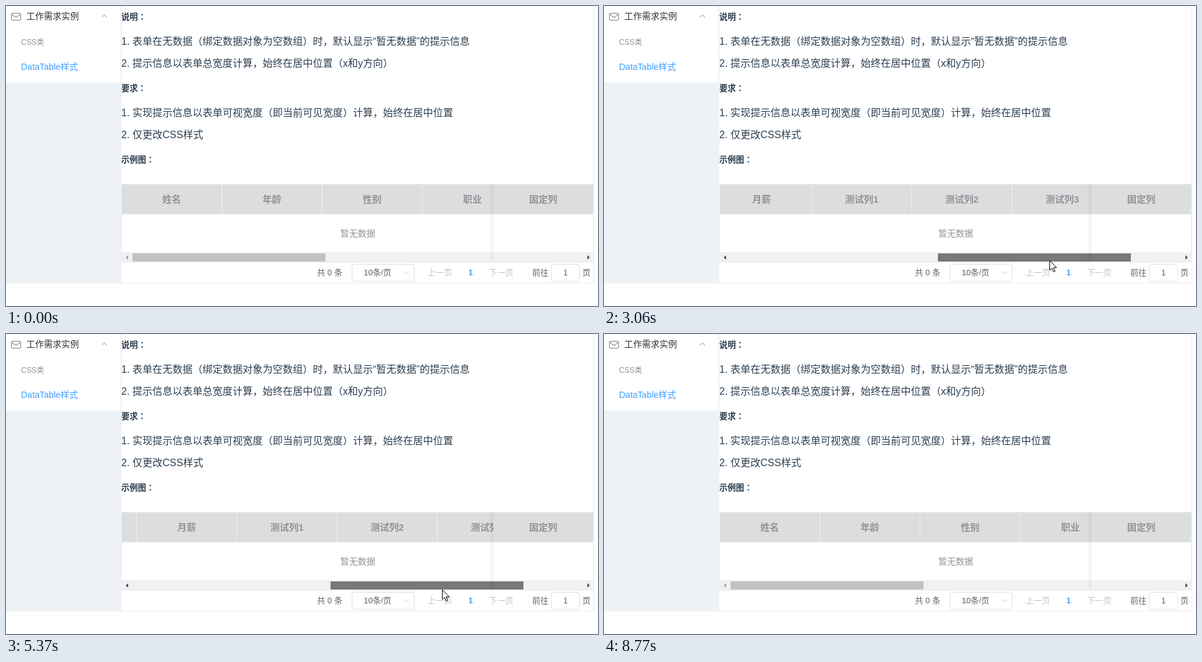
An HTML page that plays this animation: 945 px wide and 479 px high, repeating every 9.47 s.

```html
<!DOCTYPE html>
<html lang="zh-CN">
<head>
<meta charset="utf-8">
<title>DataTable</title>
<style>
  html, body { margin: 0; width: 100%; height: 100%; overflow: hidden; background: #fff; }
  svg { display: block; }
  text { font-family: "Liberation Sans", Arial, "Noto Sans CJK SC", "Noto Sans CJK", sans-serif; }
  /* this cut centres the full-width colon */
  .title { font-family: "Noto Sans CJK JP", "Noto Sans CJK", sans-serif; }
  .title, .bold { font-weight: 700; }
  .mid { text-anchor: middle; }
  .line { fill: none; stroke: #ebeef5; shape-rendering: crispEdges; }
  .box { fill: #fff; stroke: #dcdfe6; }
  .icon { fill: none; stroke: #909399; }
</style>
</head>
<body>
<svg width="945" height="479" viewBox="0 0 945 479">
  <defs>
    <clipPath id="view"><rect x="185" y="285" width="593" height="47"/></clipPath>
    <linearGradient id="shade">
      <stop offset="0" stop-opacity="0"/>
      <stop offset="1" stop-opacity=".05"/>
    </linearGradient>
  </defs>

  <!-- side menu -->
  <rect y="122" width="184" height="321" fill="#eef1f6"/>
  <path d="M183.5 0V122" stroke="#e6e6e6"/>
  <rect class="icon" x="8.6" y="11.6" width="14.8" height="11" rx="1.5" stroke-width="1.2"/>
  <path class="icon" d="M9 13.2L16 18.6L23 13.2" stroke-width="1.2"/>
  <path class="icon" d="M153 18L157 14L161 18"/>

  <!-- page edges -->
  <path d="M938.5 0V442.5H184" fill="none" stroke="#eaeaea" shape-rendering="crispEdges"/>

  <!-- table -->
  <rect x="184" y="284" width="754" height="48" fill="#dcdddd"/>
  <g clip-path="url(#view)"><g id="head"></g></g>
  <path class="line" d="M184 284.5H938M184 332.5H938M184.5 284V409M937.5 284V409M184 409.5H938"/>

  <!-- scrollbar -->
  <rect x="185" y="393" width="753" height="16" fill="#f1f1f1"/>
  <rect id="thumb" y="395" width="308" height="13"/>
  <path id="left" d="M191 401.5L195 398V405Z"/>
  <path id="right" d="M932 401.5L928 398V405Z"/>
  <rect x="770" y="285" width="8" height="123" fill="url(#shade)"/>

  <!-- pager -->
  <rect class="box" x="552.5" y="412.5" width="99" height="27" rx="3"/>
  <rect class="box" x="870.5" y="412.5" width="45" height="27" rx="3"/>
  <path d="M635.5 424L639.5 428L643.5 424" fill="none" stroke="#c0c4cc"/>

  <g id="labels"></g>
  <path id="cursor" d="M.5 .5V16L4.1 12.6L6.6 18.5L9 17.5L6.5 11.7H11.5Z" fill="#fff" stroke="#000"/>
</svg>
<script>
const $ = id => document.getElementById(id);
const INK = '#2c3e50', GREY = '#909399', DARK = '#606266', PALE = '#c0c4cc', BLUE = '#409eff';

function add(parent, tag, attrs, content = '') {
  const el = document.createElementNS('http://www.w3.org/2000/svg', tag);
  for (const k in attrs) el.setAttribute(k, attrs[k]);
  el.textContent = content;
  parent.append(el);
}

function label(content, x, y, size, fill, style = '', parent = $('labels')) {
  const lang = style === 'title' ? 'ja' : 'zh-CN';
  add(parent, 'text', { x, y, 'font-size': size, fill, class: style, lang }, content);
}

label('工作需求实例', 32.5, 21, 14, '#303133');
label('CSS类', 24, 62, 12, GREY);
label('DataTable样式', 24, 102, 14, BLUE);

const sections = {
  '说明：': [
    '表单在无数据（绑定数据对象为空数组）时，默认显示“暂无数据”的提示信息',
    '提示信息以表单总宽度计算，始终在居中位置（x和y方向）'
  ],
  '要求：': [
    '实现提示信息以表单可视宽度（即当前可见宽度）计算，始终在居中位置',
    '仅更改CSS样式'
  ],
  '示例图：': []
};
Object.entries(sections).forEach(([title, items], i) => {
  const top = 22 + 114 * i;
  label(title, 184, top, 13.28, INK, 'title');
  items.forEach((item, j) => label(`${j + 1}. ${item}`, 184, top + 40 + 35 * j, 16, INK));
});

const columns = ['姓名', '年龄', '性别', '职业', '出生日期', '月薪', '测试列1', '测试列2', '测试列3', '测试列4'];
columns.forEach((name, i) => {
  const x = 184 + 160 * i;
  add($('head'), 'path', { class: 'line', d: `M${x + 160.5} 285V332` });
  label(name, x + 80.5, 314, 15, GREY, 'mid bold', $('head'));
});
label('固定列', 857.5, 314, 15, GREY, 'mid bold');
label('暂无数据', 561.5, 368, 14, GREY, 'mid');

const pager = (content, x, fill, style) => label(content, x, 430, 13, fill, style);
pager('共 0 条', 496.5, DARK);
pager('10条/页', 593, DARK, 'mid');
pager('上一页', 673, PALE);
pager('1', 741.5, BLUE, 'mid bold');
pager('下一页', 771, PALE);
pager('前往', 840, DARK);
pager('1', 893, DARK, 'mid');
pager('页', 920, DARK);

const LOOP = 9470, STEP = 76.9;
const TRACK = 202, THUMB = 308, TRAVEL = 410, SCROLL = 1007;
const GRIP = 380; // pointer x with the thumb at rest

// The pointer moves in bursts and rests between them
const bursts = [[200, 970], [1360, 2740], [2910, 3990], [4220, 8140], [8310, 8770]];

// Pointer path: time, x, y
const path = [
  [200, 590, 466], [970, GRIP, 404],
  [1360, 383, 404], [1668, 423, 406], [2360, 730, 411], [2590, 803, 408],
  [2910, 780, 407], [3604, 468, 401], [3990, 379, 403],
  [4220, 385, 404], [4681, 658, 405], [5140, 796, 409],
  [6064, 399, 405], [6220, GRIP, 404], [7150, 537, 376],
  [8140, 607, 376], [8310, 628, 378], [8693, 910, 464]
];

function snap(t) {
  const burst = bursts.filter(b => b[0] <= t).pop();
  if (!burst) return bursts[0][0];
  const [start, end] = burst;
  return Math.min(end, start + STEP * Math.floor((t - start + 6) / STEP));
}

function pointer(t) {
  // one and a half circles around the empty-table text
  if (t > 7150 && t < 8140) {
    const angle = 2.4 + 4.6 * (t - 7150) / 990;
    return [572 + 47 * Math.cos(angle), 363 + 19 * Math.sin(angle)];
  }
  const next = path.findIndex(k => k[0] > t);
  if (next < 0) return path[path.length - 1].slice(1);
  const [t0, ...a] = path[next - 1], [t1, ...b] = path[next];
  return a.map((v, i) => v + (b[i] - v) * (t - t0) / (t1 - t0));
}

function draw(t) {
  const [x, y] = pointer(snap(t)).map(Math.round);
  const shown = t >= 200 && t < 8770;
  const held = t >= 1360 && t < 6290;
  const travel = held ? Math.max(0, Math.min(TRAVEL, x - GRIP)) : 0;
  const scroll = Math.round(travel * SCROLL / TRAVEL);
  const left = TRACK + travel;
  const over = shown && y >= 395 && y < 408 && x >= left && x < left + THUMB;
  const arrow = on => on ? '#505050' : '#a3a3a3';

  $('head').setAttribute('transform', `translate(${-scroll})`);
  $('thumb').setAttribute('x', left);
  $('thumb').setAttribute('fill', held ? '#787878' : over ? '#a8a8a8' : '#c1c1c1');
  $('left').setAttribute('fill', arrow(travel > 0));
  $('right').setAttribute('fill', arrow(travel < TRAVEL));
  $('cursor').setAttribute('transform', `translate(${x} ${y})`);
  $('cursor').setAttribute('visibility', shown ? 'visible' : 'hidden');
}

const begin = performance.now();
function tick() {
  draw((performance.now() - begin) % LOOP);
  requestAnimationFrame(tick);
}
tick();
</script>
</body>
</html>
```
